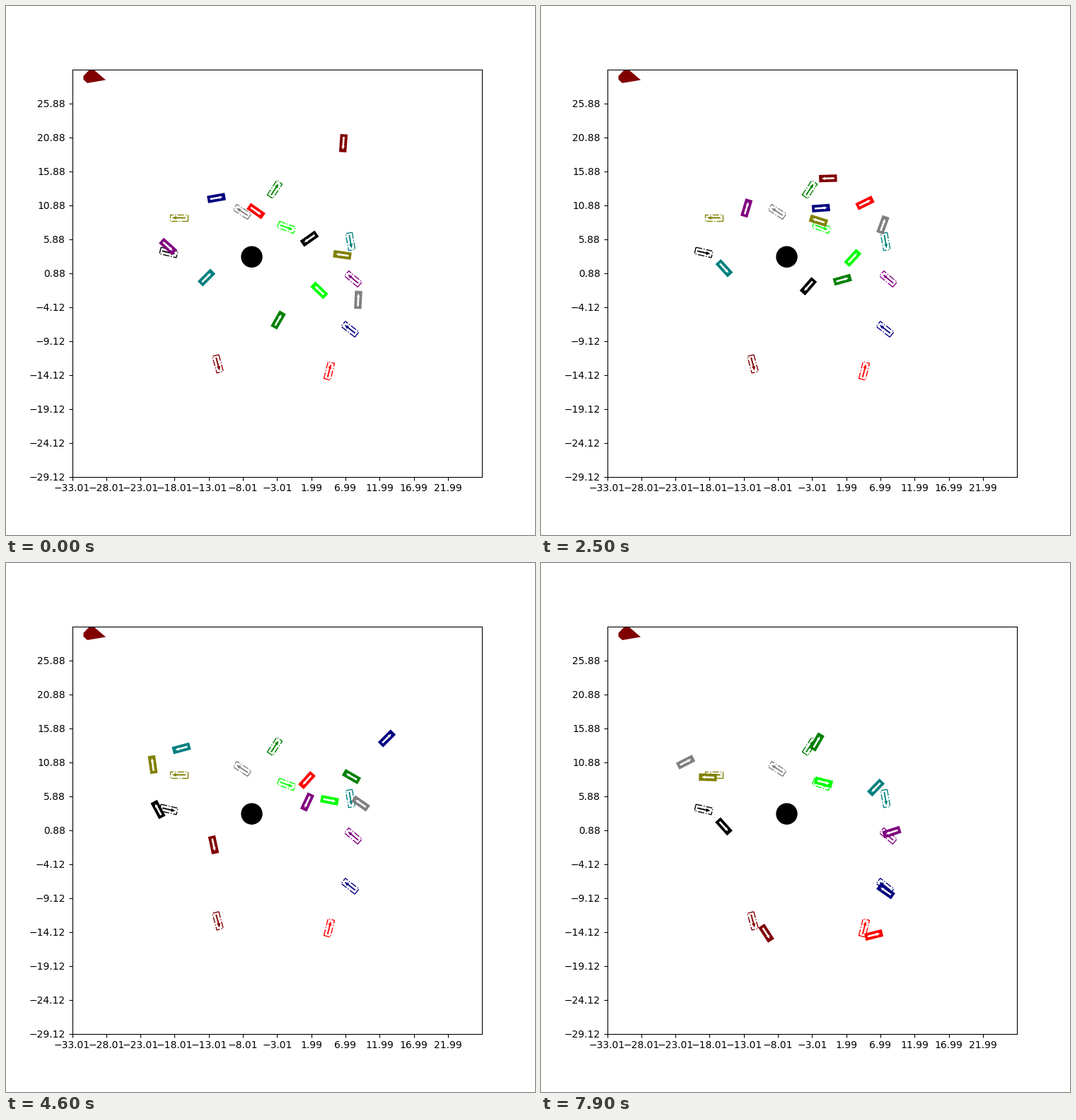
A matplotlib script that plays this animation: 748x748 px, repeating every 8 s.

```python
import numpy as np
import matplotlib.pyplot as plt
from matplotlib.animation import FuncAnimation
from matplotlib.patches import Circle, Polygon

SIZE, FRAMES, STEP = 748, 80, 100
KEYS = [1, 16, 33, 46, 58, 66, 79]      # frames of the main poses
LEFT, RIGHT, TOP, BOTTOM = 93.5, 673.2, 89.76, 665.72

fig = plt.figure(figsize=(SIZE / 100, SIZE / 100), dpi=100, facecolor="white")
ax = fig.add_axes([0.125, 0.11, 0.775, 0.77])
ax.set_xlim(LEFT, RIGHT)
ax.set_ylim(BOTTOM, TOP)


def labels(start):
    return [f"{start + 5 * i:.2f}".replace("-", "\u2212") for i in range(12)]


ticks = np.arange(12) / 12
ax.set_xticks(LEFT + (RIGHT - LEFT) * ticks, labels(-33.01))
ax.set_yticks(BOTTOM + (TOP - BOTTOM) * ticks, labels(-29.12))


def box(length, width):
    a, b = length / 2, width / 2
    return np.array([(-a, -b), (a, -b), (a, b), (-a, b)])


def arrow(length, shaft, head, head_len):
    a, s, h = length / 2, shaft / 2, head / 2
    n = a - head_len
    return np.array([(-a, -s), (n, -s), (n, -h), (a, 0), (n, h), (n, s), (-a, s)])


def place(shape, x, y, angle):
    """Turn a shape by a counter-clockwise angle on the y-down stage."""
    c, s = np.cos(angle), np.sin(angle)
    return shape @ np.array([(c, -s), (s, c)]) + (x, y)


def unit(deg):
    a = np.radians(deg)
    return np.array([np.cos(a), -np.sin(a)])


BODY, BODY_ARROW = box(25.4, 10.4), arrow(18, 2.6, 4.6, 5)
GOAL, GOAL_ARROW = box(24.4, 9.4), arrow(18, 1.3, 4.2, 5)


class Car:
    def __init__(self, color, goal, gears, *poses, extra=None):
        x, y, deg = goal
        ax.add_patch(Polygon(place(GOAL, x, y, np.radians(deg)), fill=False,
                             ec=color, lw=1, ls="-.", zorder=2))
        ax.add_patch(Polygon(place(GOAL_ARROW, x, y, np.radians(deg)),
                             fc=color, ec=color, lw=0.4, zorder=2))
        self.body = ax.add_patch(Polygon(BODY, fc=color, ec="none", zorder=4))
        self.mark = ax.add_patch(Polygon(BODY_ARROW, fc="white", ec="none", zorder=4))
        sign = {"+": 1, "-": -1, "0": 0}
        rows = [(k, sign[g], *p) for k, g, p in zip(KEYS, gears, poses)]
        rows += [(k, 1, *p) for k, p in (extra or {}).items()]
        rows = np.array(sorted(rows), float)
        self.t, self.gear, self.deg = rows[:, 0], rows[:, 1], rows[:, 4]
        self.pos = rows[:, 2:4]
        self.chord = np.hypot(*np.diff(self.pos, axis=0).T)
        self.vel = self.velocities()

    def velocities(self):
        # path length grows with the turn; gear changes need room
        turn = np.radians(np.abs(np.diff(self.deg)))
        length = self.chord * np.minimum(1 / np.cos(turn / 4) ** 2, 2.5)
        flip = self.gear[:-1] * self.gear[1:] < 0
        length = np.where(flip, np.maximum(length, 140), length)
        v = length / np.diff(self.t)
        mid = 2 * v[:-1] * v[1:] / (v[:-1] + v[1:])
        speed = np.concatenate([[0.3 * v[0]], mid, [0.6 * v[-1]]])
        return (self.gear * speed)[:, None] * unit(self.deg).T

    def pose(self, frame):
        t = np.clip(frame, self.t[0], self.t[-1])
        i = min(np.searchsorted(self.t, t, side="right") - 1, len(self.t) - 2)
        dt = self.t[i + 1] - self.t[i]
        u = (t - self.t[i]) / dt
        p, q = self.pos[i], self.pos[i + 1]
        m, n = self.vel[i] * dt, self.vel[i + 1] * dt
        ease = u * u * (3 - 2 * u)
        point = (p + (q - p) * ease + m * u * (1 - u) ** 2 - n * u * u * (1 - u))
        if self.gear[i] * self.gear[i + 1] > 0 and self.chord[i] > 15:
            d = (6 * u * (1 - u) * (q - p) + (1 - u) * (1 - 3 * u) * m
                 + u * (3 * u - 2) * n) * self.gear[i]
            angle = np.arctan2(-d[1], d[0])
        else:
            angle = np.radians(self.deg[i] + (self.deg[i + 1] - self.deg[i]) * ease)
        return point[0], point[1], angle

    def draw(self, frame):
        pose = self.pose(frame)
        self.body.set_xy(place(BODY, *pose))
        self.mark.set_xy(place(BODY_ARROW, *pose))


# obstacles
ax.add_patch(Circle((347.5, 354.7), 14.5, color="black", zorder=1))
ax.add_patch(Polygon([(109.5, 99), (119, 89), (124, 90), (141, 104.6),
                      (115, 109), (109.5, 104)], fc="maroon", ec="none", zorder=1))

# goal pose, gear at each key, then (x, y, heading) at each key
cars = [
    Car("black", (230, 348.5, -13), "+++0-++",
        (429, 329, 215), (397.5, 352, 263), (333, 408.5, 160), (215, 348.5, 118),
        (246, 368, 212), (211, 342, 50), (258.5, 372.5, -48)),
    Car("gray", (334, 291, 147), "+++++++",
        (498, 415.5, 87), (476, 379.5, 103), (531, 275.5, -14), (501.5, 340, -215),
        (346.5, 282, -170), (287, 352, -130), (204.5, 281.5, -333),
        extra={39: (574, 305, -95)}),
    Car("red", (457, 516, 76), "+++++++",
        (353.5, 290, -35), (396, 298.5, 18), (480, 237, 117), (425.5, 307, 228),
        (446, 474, 287), (426.5, 560, 320), (470.5, 526, 374)),
    Car("lime", (396.5, 313, -20), "+++----",
        (443, 402, 136), (431, 377.5, 89), (467, 335.5, 33), (457.5, 335.5, -11),
        (409, 315, -40), (397.5, 308, -22), (399.5, 310, -14)),
    Car("green", (380, 259.5, 57), "+++++++",
        (385, 444, 60), (399.5, 406, 64), (469.5, 382.5, 0), (488.5, 302, 150),
        (384.5, 243.5, 155), (360.5, 273.5, 338), (390, 253, 420)),
    Car("navy", (486.5, 457, 142), "+++0--+",
        (297.5, 271.5, 10), (338, 287, -20), (457.5, 293, -26), (538.5, 248, 45),
        (468, 406, 94), (512, 498.5, 170), (487.5, 464, 145)),
    Car("olive", (244.5, 299.5, 180), "+++++++",
        (475.5, 352, 172), (439, 333, 120), (324.5, 298.5, 190), (207.5, 285, 98),
        (260.5, 294.5, -118), (236.5, 305, -200), (236, 303, -182)),
    Car("teal", (487, 333, -80), "+------",
        (283.5, 384, 45), (293, 378.5, 5), (259.5, 345, -118), (248, 262, -165),
        (372.5, 307.5, -268), (445, 345.5, -184), (473.5, 317.5, -134)),
    Car("purple", (491, 386, 140), "+++++++",
        (229, 340, -42), (270.5, 342, 35), (333, 230.5, 24), (426, 338, -115),
        (505, 359.5, 152), (481, 413, 336), (496, 380.5, 558)),
    Car("maroon", (299.5, 506, -75), "+++++++",
        (477, 194, 266), (460, 234, 238), (339, 262, 218), (293.5, 398.5, 282),
        (281, 502, 300), (314.5, 517.5, 318), (318.5, 523.5, 303)),
]


def update(frame):
    for car in cars:
        car.draw(frame)
    return [p for car in cars for p in (car.body, car.mark)]


anim = FuncAnimation(fig, update, frames=FRAMES, interval=STEP,
                     repeat=True, repeat_delay=0, blit=False)
plt.show()
```
